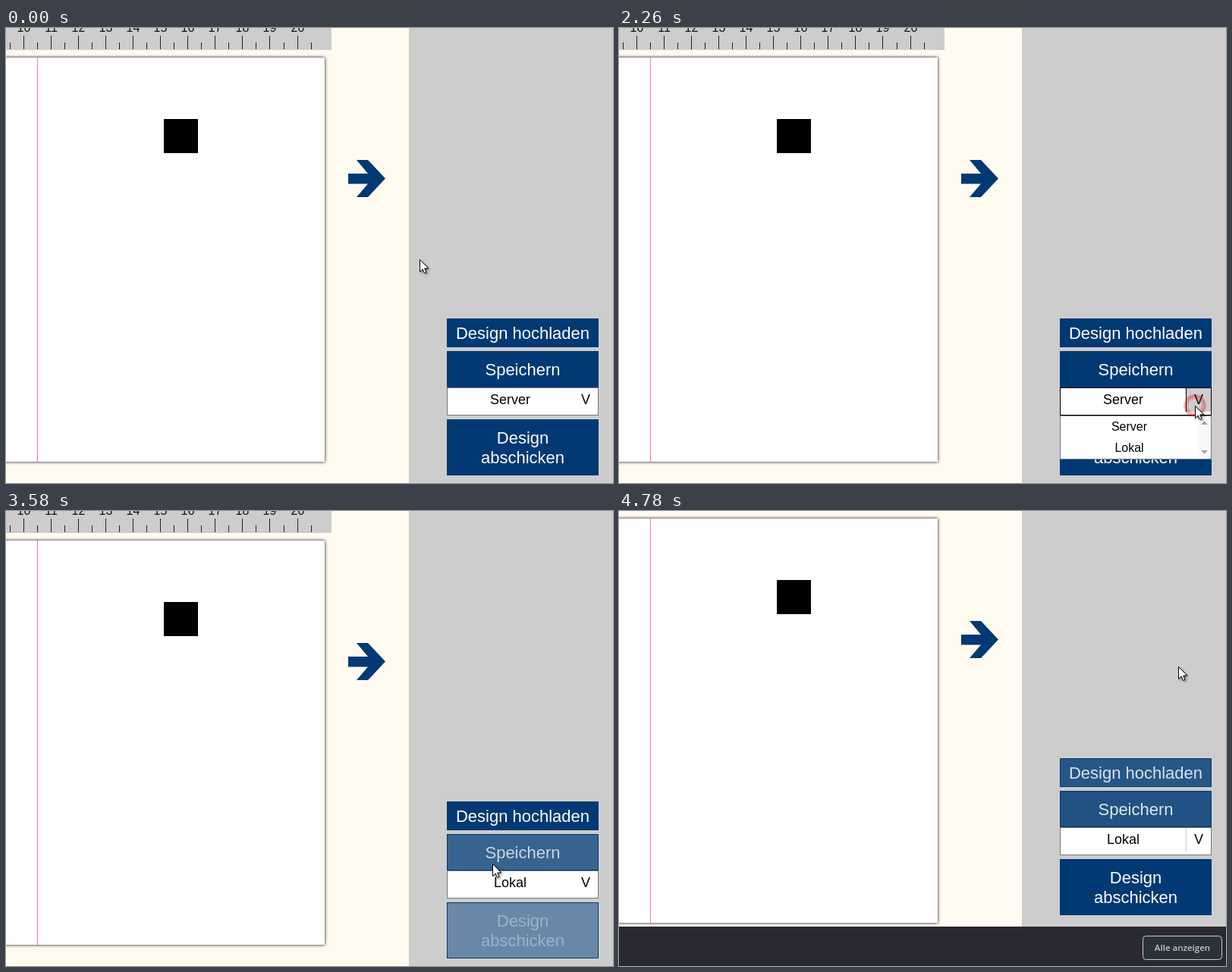
An HTML page with a canvas for the animation above (4810 ms loop, 800x600 px).

```html
<!DOCTYPE html>
<html lang="de">
<head>
<meta charset="utf-8">
<title>Design speichern</title>
<style>
html, body { margin: 0; width: 100%; height: 100%; overflow: hidden; }
canvas { display: block; }
</style>
</head>
<body>
<canvas id="stage" width="800" height="600"></canvas>
<script>
const ctx = document.getElementById('stage').getContext('2d', { alpha: false });
const LOOP = 4810, STEP = 30;
const LIST_OPEN = 1850, LIST_CLOSE = 2970;
const NAVY = [0, 57, 115], WHITE = [255, 255, 255];
const HOVER = [230, 230, 230], HOVER_TEXT = [36, 86, 138];
const ACTIVE = [148, 206, 240], ACTIVE_TEXT = [107, 141, 180];
const ARIAL = '"Liberation Sans", Arial, sans-serif';

// Places where the pointer rests.
const HOME = [545, 305], TOGGLE = [759, 498], LOCAL = [684, 554];
const SAVE = [634, 451], AWAY = [737, 205];

const ramp = (t, start, span) => Math.min(1, Math.max(0, (t - start) / span));
const smooth = p => p * p * (3 - 2 * p);
const mix = (a, b, p) => a.map((v, i) => v + (b[i] - v) * p);
const rgb = c => `rgb(${c.map(Math.round)})`;

// Transition that rises on enter and falls from wherever it got to on leave.
const fade = (t, enter, leave, span = 350) =>
  Math.max(0, ramp(Math.min(t, leave), enter, span) - ramp(t, leave, span));

function bezier(points, p) {
  while (points.length > 1) points = points.slice(1).map((b, i) => mix(points[i], b, p));
  return points[0];
}

function pointer(t) {
  const glide = (start, span, ...points) => bezier(points, smooth(ramp(t, start, span)));
  if (t < 2290) return glide(130, 1060, HOME, [462, 420], [600, 560], TOGGLE);
  if (t < 3190) return glide(2290, 380, TOGGLE, LOCAL);
  if (t < 4430) return glide(3190, 510, LOCAL, SAVE);
  return glide(4430, 350, SAVE, AWAY);
}

function rect(x, y, w, h, color) {
  ctx.fillStyle = color;
  ctx.fillRect(x, y, w, h);
}

function frame(x, y, w, h, color) {
  ctx.strokeStyle = color;
  ctx.lineWidth = 1;
  ctx.strokeRect(x + 0.5, y + 0.5, w - 1, h - 1);
}

function text(str, x, y, size, color, font = ARIAL) {
  ctx.font = `${size}px ${font}`;
  ctx.textAlign = 'center';
  ctx.fillStyle = color;
  ctx.fillText(str, x, y);
}

function polygon(points, color) {
  ctx.beginPath();
  points.forEach(p => ctx.lineTo(...p));
  ctx.closePath();
  ctx.fillStyle = color;
  ctx.fill();
}

function drawCard() {
  rect(0, 0, 429, 29, '#cdcdcd');
  for (let i = 0; i < 23; i++) {
    const x = Math.floor(5 + i * 18.05), major = i % 2;
    rect(x, major ? 10 : 19, 1, major ? 18 : 9, '#222');
    if (major) text(10 + (i - 1) / 2, x + 0.5, 5, 16, '#111');
  }
  ctx.save();
  ctx.shadowColor = '#000';
  ctx.shadowBlur = 4;
  rect(-10, 39, 430, 533, '#fff');
  ctx.restore();
  rect(41, 39, 1, 533, '#ff69b4');
  rect(208, 120, 45, 45, '#000');
  polygon([[451, 192], [477, 192], [462, 174], [477, 174], [500, 198.5],
    [477, 223], [462, 223], [477, 205.5], [451, 205.5]], rgb(NAVY));
}

function button(y, h, lines, hover, active = 0) {
  const fill = mix(mix(NAVY, HOVER, hover), ACTIVE, active);
  const ink = mix(mix(WHITE, HOVER_TEXT, hover), ACTIVE_TEXT, active);
  rect(581, y, 200, h, rgb(fill));
  frame(581, y, 200, h, rgb(NAVY));
  lines.forEach((str, i) => text(str, 681, y + h / 2 + 7.5 + 26 * (i - (lines.length - 1) / 2), 22, rgb(ink)));
}

function drawSelect(t, hovered) {
  const toggle = fade(t, 1090, 2340, 60), divider = fade(t, 4470, 4660);
  rect(581, 474, 200, 37, '#fff');
  rect(747, 475, 33, 31, `rgba(205,205,205,${toggle})`);
  rect(747, 475, 1, 31, `rgba(0,0,0,${Math.max(toggle, divider)})`);
  frame(581, 474, 200, 37, hovered ? '#000' : '#777');
  text(t < LIST_CLOSE ? 'Server' : 'Lokal', 664.5, 496, 18, '#000');
  text('V', 764, 496, 18, '#000');
}

function drawList(y) {
  rect(581, 511, 200, 58, '#fff');
  rect(763, 512, 17, 56, '#f8f8f8');
  ['Server', 'Lokal'].forEach((str, i) => {
    const top = 512 + 28 * i, dir = i ? 1 : -1, mid = 540 + 19 * dir;
    if (y >= top && y < top + 28) rect(582, top, 181, 28, '#e6e6e6');
    text(str, 672.5, top + 19, 16, '#000');
    polygon([[767, mid - 2 * dir], [771.5, mid + 2.5 * dir], [776, mid - 2 * dir]], '#a3a3a3');
  });
  frame(581, 511, 200, 58, '#777');
}

function drawPanel(t, x, y) {
  button(383, 38, ['Design hochladen'], fade(t, 4480, 4660));
  button(426, 48, ['Speichern'], fade(t, 3520, 4480, 250 + 100 * (t > 4480)), fade(t, 3880, 4480, 300));
  drawSelect(t, x >= 581 && y >= 474 && y < 511);
  button(516, 74, ['Design', 'abschicken'], fade(t, LIST_CLOSE, 3390));
  if (t >= LIST_OPEN && t < LIST_CLOSE) drawList(y);
}

function drawBar() {
  rect(0, 600, 800, 52, '#292a31');
  ctx.beginPath();
  ctx.roundRect(690.5, 612.5, 104, 31, 4);
  ctx.fillStyle = '#2b3238';
  ctx.fill();
  ctx.strokeStyle = '#c5cbd0';
  ctx.stroke();
  text('Alle anzeigen', 742.5, 632, '600 11.5', '#c5c9cd', '"Open Sans", "Noto Sans", sans-serif');
}

function drawClick(t, start, [x, y]) {
  const p = (t - start) / 660;
  if (p < 0 || p >= 1) return;
  const r = 5 + 14 * p, alpha = Math.min(1, 2 * (1 - p));
  const red = a => `rgba(225,10,20,${a})`;
  const glow = ctx.createRadialGradient(x, y, 0, x, y, r);
  glow.addColorStop(0, red(Math.max(0, 1 - 2 * p)));
  glow.addColorStop(0.45, red(Math.max(0, 1 - 1.6 * p)));
  glow.addColorStop(0.8, red(alpha));
  glow.addColorStop(1, red(0));
  ctx.beginPath();
  ctx.arc(x, y, r, 0, 7);
  ctx.fillStyle = glow;
  ctx.fill();
}

function drawCursor(x, y) {
  ctx.save();
  ctx.translate(Math.round(x) + 0.5, Math.round(y) + 0.5);
  ctx.shadowColor = 'rgba(0,0,0,.5)';
  ctx.shadowBlur = 3;
  ctx.shadowOffsetX = ctx.shadowOffsetY = 2;
  polygon([[0, 0], [0, 16], [3.7, 12.6], [6, 18], [8.5, 17], [6.2, 11.6], [11.3, 11.3]], '#fff');
  ctx.shadowColor = 'transparent';
  ctx.strokeStyle = '#000';
  ctx.lineWidth = 1;
  ctx.stroke();
  ctx.restore();
}

function raised(dy, draw) {
  ctx.save();
  ctx.translate(0, -Math.round(dy));
  draw();
  ctx.restore();
}

function render(now) {
  const t = 10 + STEP * Math.floor((now % LOOP - 10) / STEP);
  const [x, y] = pointer(t), rise = ramp(t, 4480, 90);
  rect(0, 0, 800, 600, '#fffbf1');
  raised(29 * rise, drawCard);
  rect(531, 0, 269, 600, '#cdcdcd');
  raised(57 * rise, () => drawPanel(t, x, y));
  raised(52 * rise, drawBar);
  drawClick(t, 1740, TOGGLE);
  drawClick(t, 2870, [682, 554]);
  drawClick(t, 3730, SAVE);
  drawCursor(x, y);
}

const begin = performance.now();
function tick() {
  render(performance.now() - begin);
  requestAnimationFrame(tick);
}
tick();
</script>
</body>
</html>
```
